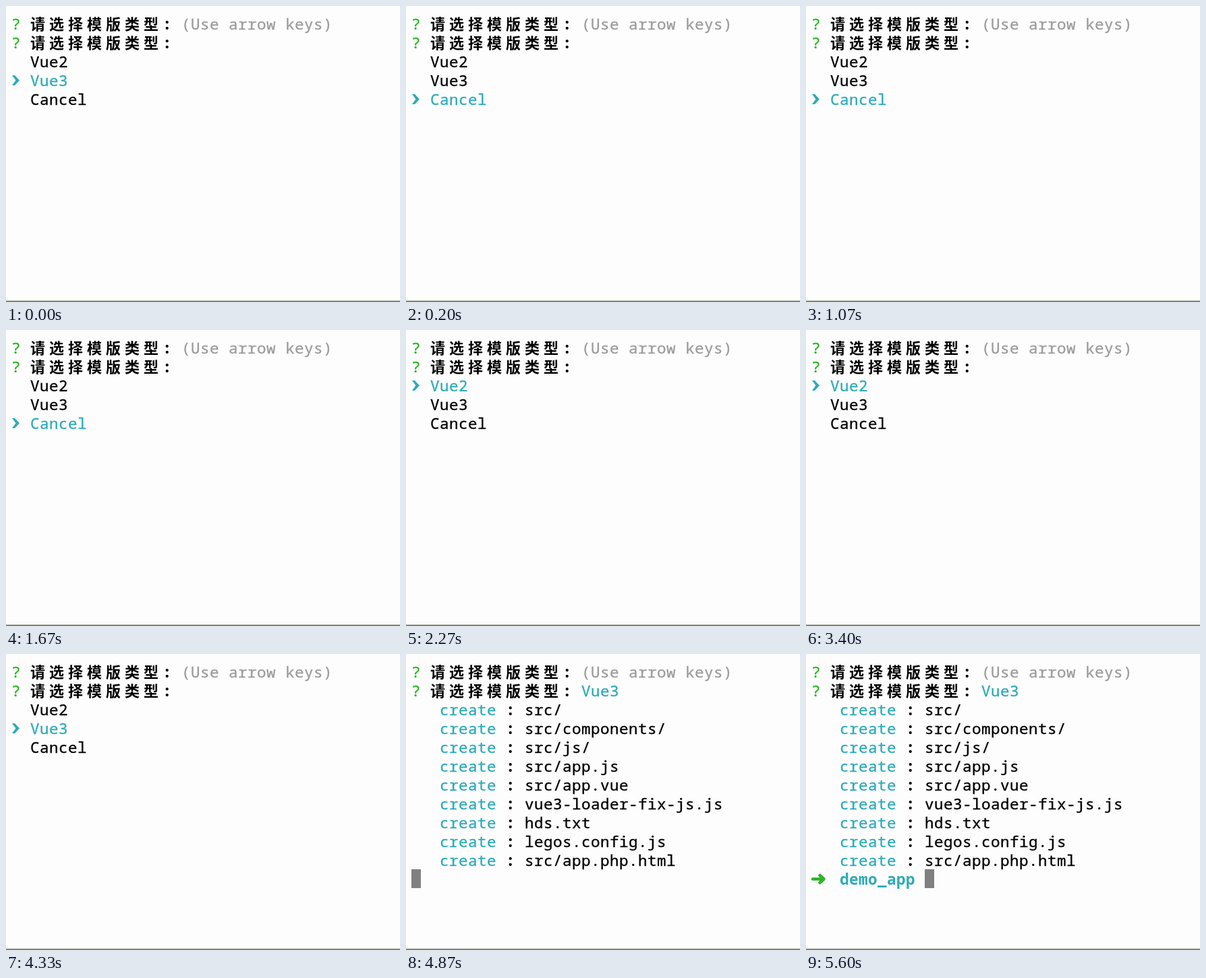
These frames come from a looping animation (584 by 440 pixels, 5.79 s). An HTML page:

```html
<!DOCTYPE html>
<html lang="zh">
<head>
<meta charset="utf-8">
<title>CLI prompt</title>
<style>
html, body { margin: 0; width: 100%; height: 100%; overflow: hidden; background: #fdfdfd; }
svg { display: block; width: 584px; height: 440px; color: #000; }
text { font: 500 22.5px "Noto Sans Mono", "DejaVu Sans Mono", monospace; letter-spacing: .5px; white-space: pre; fill: currentColor; stroke: currentColor; stroke-width: .35px; }
.cjk { font: 700 22px "Noto Sans CJK SC", "Noto Sans CJK", sans-serif; letter-spacing: 6px; stroke: none; }
.bold { font-weight: 700; stroke: none; }
.teal { color: #2cabb9; }
.green { color: #2fb425; }
.grey { color: #9c9c9c; }
.cursor { fill: #808080; }
.pointer { fill: currentColor; }
.arrow { fill: none; stroke: currentColor; stroke-width: 4.5px; stroke-linecap: round; stroke-linejoin: round; }
</style>
</head>
<body>
<svg viewBox="0 0 584 440">
  <g id="head"></g>
  <g id="menu"></g>
  <g id="log"></g>
  <g id="shell"></g>
  <rect y="438" width="584" height="2" fill="#828270"/>
</svg>
<script>
const LOOP = 5790, CELL = 14, LINE = 28, LEFT = 8, TOP = 12, BASE = 23;
const OPTIONS = ['Vue2', 'Vue3', 'Cancel'];
const FILES = ['src/', 'src/components/', 'src/js/', 'src/app.js', 'src/app.vue',
  'vue3-loader-fix-js.js', 'hds.txt', 'legos.config.js', 'src/app.php.html'];

// [start ms, selected option] until the answer is given
const STEPS = [[0, 1], [130, 2], [670, 0], [1070, 2], [1330, 1], [1530, 0], [1670, 2],
  [2000, 1], [2270, 0], [2730, 1], [3400, 0], [3670, 1], [4400, 0], [4670, 1]];
const ANSWER = 4870, PROMPT = 5600;

const $ = id => document.getElementById(id);

function add(parent, tag, attrs, content = '') {
  const el = document.createElementNS('http://www.w3.org/2000/svg', tag);
  for (const key in attrs) el.setAttribute(key, attrs[key]);
  el.textContent = content;
  return parent.appendChild(el);
}

const write = (parent, col, row, str, cls = '') =>
  add(parent, 'text', { x: LEFT + col * CELL, y: TOP + row * LINE + BASE, class: cls }, str);

const block = (parent, col, row) => add(parent, 'rect',
  { x: LEFT + col * CELL, y: TOP + row * LINE, width: CELL, height: LINE, class: 'cursor' });

for (const row of [0, 1]) {
  write($('head'), 0, row, '?', 'green');
  write($('head'), 2, row, '请选择模版类型', 'cjk');
  write($('head'), 16, row, ':', 'bold');
}
write($('head'), 18, 0, '(Use arrow keys)', 'grey');

const items = OPTIONS.map((name, i) => write($('menu'), 2, i + 2, name));
const pointer = add($('menu'), 'path', { d: 'M9 7h4l7 7.5-7 7.5H9l5.5-7.5z', class: 'pointer teal' });

write($('log'), 18, 1, 'Vue3', 'teal');
FILES.forEach((file, i) => {
  write($('log'), 3, i + 2, 'create', 'teal');
  write($('log'), 10, i + 2, ':', 'bold');
  write($('log'), 12, i + 2, file);
});
const waiting = block($('log'), 0, 11);

add($('shell'), 'path', { d: 'M10 334.5H25M20.5 329l6 5.5-6 5.5', class: 'arrow green' });
write($('shell'), 3, 11, 'demo_app', 'teal bold');
block($('shell'), 12, 11);

const show = (el, on) => el.setAttribute('visibility', on ? 'visible' : 'hidden');

function draw(now) {
  const t = now % LOOP;
  const selected = STEPS.filter(step => step[0] <= t).pop()[1];
  items.forEach((item, i) => item.setAttribute('class', i === selected ? 'teal' : ''));
  pointer.setAttribute('transform', `translate(0 ${TOP + (selected + 2) * LINE})`);
  show($('menu'), t < ANSWER);
  show($('log'), t >= ANSWER);
  show(waiting, t >= ANSWER && t < PROMPT);
  show($('shell'), t >= PROMPT);
}

let start;
function tick(now) {
  start ??= now;
  draw(Math.max(0, now - start));
  requestAnimationFrame(tick);
}
draw(0);
requestAnimationFrame(tick);
</script>
</body>
</html>
```
